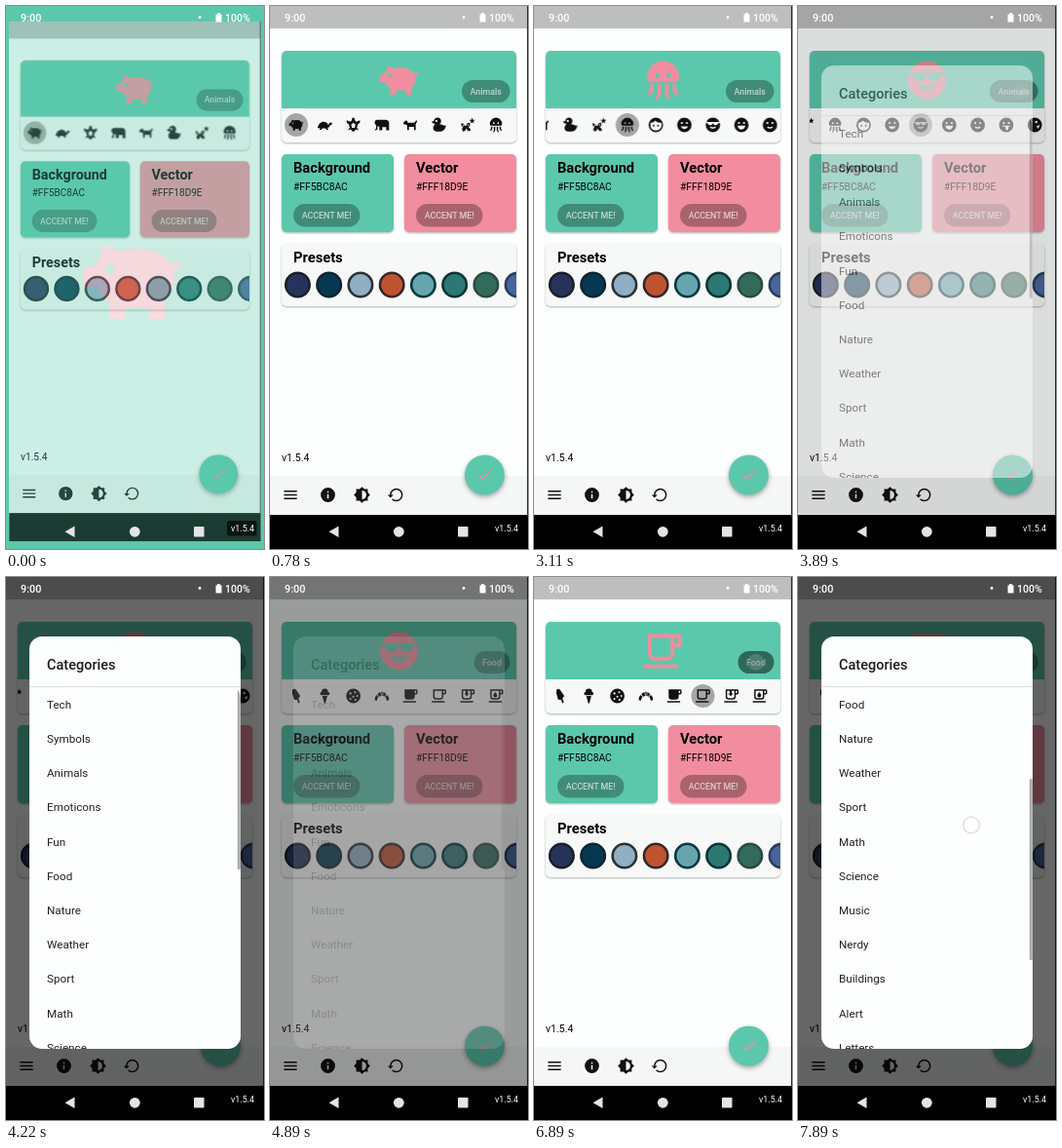
These frames come from a looping animation (265x557 px, 8 s). An HTML page:

```html
<!DOCTYPE html>
<html lang="en">
<head>
<meta charset="utf-8">
<title>Icon picker</title>
<style>
html, body { margin: 0; width: 100%; height: 100%; overflow: hidden; background: #5bc8ac; }
svg { display: block; }
text { font-family: Roboto, sans-serif; }
.card { filter: drop-shadow(0 1px 1.2px rgba(0,0,0,.3)); }
.fab { filter: drop-shadow(0 2px 2.5px rgba(0,0,0,.35)); }
.h { font-size: 14.7px; font-weight: 700; }
.b { font-size: 8.9px; font-weight: 500; fill: #fff; fill-opacity: .65; text-anchor: middle; }
.item { font-size: 11.7px; fill: #222; }
</style>
</head>
<body>
<svg id="stage" width="265" height="557" viewBox="0 0 265 557"></svg>
<script>
const LOOP = 8000, TEAL = '#5bc8ac', PINK = '#f18d9e', PALE = '#f7f9f8';
const DISC = 'M12 2A10 10 0 1 0 12 22A10 10 0 1 0 12 2Z';
const dot = (x, y, r) => `M${x - r} ${y}a${r} ${r} 0 1 0 ${2 * r} 0a${r} ${r} 0 1 0 ${-2 * r} 0Z`;
const EYES = dot(8.5, 9.3, 1.5) + dot(15.5, 9.3, 1.5);
const CUP = 'M2 21V19H20V21H2M20 8V5H18V8H20M20 3A2 2 0 0 1 22 5V8A2 2 0 0 1 20 10H18V13A4 4 0 0 1 14 17H8A4 4 0 0 1 4 13V3H20';
const HOLLOW = 'M16 5H6V13A2 2 0 0 0 8 15H14A2 2 0 0 0 16 13V5Z';

const PIG = 'M22 8.5C21.6 9.6 20.9 9.8 20.4 9.6C21 12.5 20 14.6 18.6 16V19.8H15.6V17.4H10.4V19.8H7.4V16.2C6 15.4 5.2 14.3 4.7 13.2H2V9.4L4.2 9C4.5 8 5.1 7.2 5.8 6.6L5.4 4.8C7 4.7 8.2 5.1 9.2 5.9C11.6 5.2 14.6 5.2 16.6 6C18.3 6.7 19.4 7.6 20 8.6C20.7 8.8 21 8.4 21.2 7.6Z' + dot(7.3, 9.6, 1);
const ANIMALS = [
  PIG,
  'M2 16.5C2.6 11 6.4 7.6 10.6 7.6C14 7.6 16 9.6 16.8 12L18.4 9.6C19.2 8.4 22 8.2 22 10.4C22 12 20.6 12.2 19.6 12.4C18.8 14.6 17.4 15.8 15.6 16.2L17.2 18.6H14.4L12.8 16.6H8.4L7 18.6H4.4L5.4 16.3Z',
  'M12 2A2 2.4 0 0 1 13.8 5.6A5.5 6.5 0 0 1 16 7.6L21 5.6Q22.6 9 18 11.4A7 7 0 0 1 16.8 15.6L19.6 19.6L15.4 18.2A5 5 0 0 1 12 21.6A5 5 0 0 1 8.6 18.2L4.4 19.6L7.2 15.6A7 7 0 0 1 6 11.4Q1.4 9 3 5.6L8 7.6A5.5 6.5 0 0 1 10.2 5.6A2 2.4 0 0 1 12 2ZM12 9L9 11.5L10.2 16H13.8L15 11.5Z',
  'M5.5 5H17Q22 5 22 10V19.5H18V15H12.5V19.5H8.5V14.5C7 14.5 6.4 13.8 6 12.8V17.5Q5.8 19.5 3.6 19.5H2.4V17.7H3.2Q4 17.6 4 16.6V12Q2 11.5 2 8.5Q2.2 5 5.5 5Z',
  'M2 9.2L5.4 6L7.4 6.2L8.4 9H17.2L20.4 5.6L21.6 6.6L19.4 10.8V19H17V14.8H10V19H7.6V13.6L6.4 11.4H3Z',
  'M10 2A5 5 0 0 1 15 7C15 8.7 14.15 10.2 12.86 11.1C14.44 11.25 16.22 11.61 18 12.5C21 14 22 12 22 12C22 12 21 21 15 21H9C9 21 4 21 4 16C4 13 7 12 6 10C2 10 2 6.5 2 6.5C3 7 4.24 7 5 6.65C5.19 4.05 7.36 2 10 2Z' + dot(8.5, 6.5, 1.5),
  'M10 14L4 9Q2 13 6 15Q3 18 6 21Q9 21.5 10 17Q13 22 16 20Q17 17 13 15.5Q17 13 15 9Q11 8 10 14ZM18.5 2L19.6 4.8L22.5 5L20.2 6.9L21 9.8L18.5 8.2L16 9.8L16.8 6.9L14.5 5L17.4 4.8Z' + dot(6.5, 13, .9) + dot(13, 12, .9),
  'M12 2A8.5 8.5 0 0 1 20.5 10.5Q20.5 12.5 19 13H5Q3.5 12.5 3.5 10.5A8.5 8.5 0 0 1 12 2ZM5 14.2H7V17Q7 19 5 20H3.4Q5 18.5 5 16ZM9 14.2H11V19L9.4 22H8L9 19ZM13 14.2H15V19L16 22H14.6L13 19ZM17 14.2H19V16Q19 18.5 20.6 20H19Q17 19 17 17Z' + dot(9, 9.5, 1.2) + dot(15, 9.5, 1.2)
];
const FACES = [
  DISC + 'M5 9Q9 9 11 6Q14 9.5 19.5 9Q21 14 17.6 17.6Q12 22 6.4 17.6Q3.4 14 5 9Z' + dot(9, 13, 1.25) + dot(15, 13, 1.25),
  DISC + EYES + 'M7 14H17Q15.5 17.6 12 17.6Q8.5 17.6 7 14Z',
  'M3.22 7.22C4.91 4.11 8.21 2 12 2C15.79 2 19.09 4.11 20.78 7.22L20 8H4L3.22 7.22M21.4 8.6C21.78 9.67 22 10.81 22 12A10 10 0 0 1 12 22A10 10 0 0 1 2 12C2 10.81 2.22 9.67 2.6 8.6L4 10H5C5 11.38 7.12 12.5 8.5 12.5C9.88 12.5 11.25 11.38 11.25 10H12.75C12.75 11.38 14.12 12.5 15.5 12.5C16.88 12.5 19 11.38 19 10H20L21.4 8.6M16.19 15.42L14.77 14C14.32 14.72 13.25 15.23 12 15.23C10.75 15.23 9.68 14.72 9.23 14L7.81 15.42C8.71 16.5 10.25 17.23 12 17.23C13.75 17.23 15.29 16.5 16.19 15.42Z',
  DISC + EYES + 'M6.5 13H17.5Q16 18.5 12 18.5Q8 18.5 6.5 13Z',
  DISC + EYES + 'M7.8 15.4L9.2 14Q12 16.4 14.8 14L16.2 15.4Q12 19 7.8 15.4Z',
  DISC + EYES + 'M7 13H17V14.5H15V17.5Q14.8 19.5 13 19.5Q11 19.5 11 17.5V14.5H7Z',
  DISC + dot(14, 8, 1.6) + 'M14 14L19 12L17 17Z'
];
const FOOD = [
  'M7 3Q10 1 12 4L17.5 12L15 15.6L17 21L15 22L13 17.5L9 17L6.5 8Z',
  'M12 2A4.5 4.5 0 0 1 16.5 6.5A2.2 2.2 0 0 1 16.5 11H7.5A2.2 2.2 0 0 1 7.5 6.5A4.5 4.5 0 0 1 12 2ZM8.5 12H15.5L12.8 22H11.2Z',
  DISC + dot(8, 8.5, 1.5) + dot(14.5, 7, 1.3) + dot(17.5, 12, 1.2) + dot(12, 13, 1.3) + dot(8, 16, 1.3) + dot(15, 17.5, 1.4),
  'M2 17Q2 12.5 5 10.5L7.5 13.5Q5.5 15 5.4 18.2Q3 19 2 17ZM5.8 9.8Q8 7 10 6.6L11 12Q9.6 12.1 8.4 12.9ZM11 6.4H13L13 12H11.9ZM14 6.6Q16 7 18.2 9.8L15.6 12.9L13.8 12.1ZM19 10.5Q22 12.5 22 17Q21 19 18.6 18.2Q18.5 15 16.5 13.5Z',
  'M2 21H20V19H2M20 8H18V5H20M20 3H4V13A4 4 0 0 0 8 17H14A4 4 0 0 0 18 13V10H20A2 2 0 0 0 22 8V5C22 3.89 21.1 3 20 3Z',
  CUP + HOLLOW,
  CUP + 'M16 5H12.5V8.5H14.5L11 12.5L7.5 8.5H9.5V5H6V13A2 2 0 0 0 8 15H14A2 2 0 0 0 16 13V5Z',
  CUP + HOLLOW + 'M11 6.5Q14 10 13.8 11.3A2.8 2.8 0 0 1 8.2 11.3Q8 10 11 6.5Z'
];
const BAR = [
  [21, 'M3 6H21V8H3V6M3 11H21V13H3V11M3 16H21V18H3V16Z'],
  [59.5, DISC + 'M11 7H13V9H11ZM11 11H13V17H11Z'],
  [94.5, 'M12 18V6A6 6 0 0 1 18 12A6 6 0 0 1 12 18M20 15.31L23.31 12L20 8.69V4H15.31L12 .69L8.69 4H4V8.69L.69 12L4 15.31V20H8.69L12 23.31L15.31 20H20V15.31Z'],
  [129, 'M13 3A9 9 0 0 0 4 12H1L4.89 15.89L9 12H6A7 7 0 0 1 13 5A7 7 0 0 1 20 12A7 7 0 0 1 13 19C11.07 19 9.32 18.21 8.06 16.94L6.64 18.36C8.27 20 10.5 21 13 21A9 9 0 0 0 22 12A9 9 0 0 0 13 3Z']
];
const CHECK = 'M21 7L9 19L3.5 13.5L4.91 12.09L9 16.17L19.59 5.59L21 7Z';
const PRESETS = [['#26345c', '#1a2029'], ['#063852', '#10242e'], ['#90afc5', '#2a3132'], ['#c05430', '#34292a'],
  ['#66a5ad', '#07393f'], ['#2c7873', '#0b3435'], ['#336b5b', '#2c4a45'], ['#46659b', '#2b3d5e']];
const LIST = ['Tech', 'Symbols', 'Animals', 'Emoticons', 'Fun', 'Food', 'Nature', 'Weather', 'Sport', 'Math', 'Science',
  'Music', 'Nerdy', 'Buildings', 'Alert', 'Letters', 'Numbers'];

// Tap times paired with the tapped position in each row
const PICKS = [[-1, 0], [1050, 1], [1320, 2], [1590, 3], [1870, 4], [2150, 5], [2450, 6], [2700, 7], [3480, 10]];
const FOOD_PICKS = [[5440, 0], [5660, 1], [5880, 2], [6080, 3], [6270, 4], [6500, 5]];
const SWAP = 4790, OPEN = [3840, 6950];

let css = '', count = 0;
// Adds keyframes from [ms, value] steps and returns the style attribute
function key(prop, steps, ease = 'linear') {
  const all = [...steps], last = all[all.length - 1];
  if (all[0][0] > 0) all.unshift([0, all[0][1]]);
  if (last[0] < LOOP) all.push([LOOP, last[1]]);
  const name = 'k' + count++;
  css += `@keyframes ${name}{${all.map(([t, v]) => `${t * 100 / LOOP}%{${prop}:${v}}`).join('')}}`;
  return `style="animation:${name} ${LOOP}ms ${ease} infinite"`;
}
function show(a, b = LOOP, fade = 1) {
  const steps = a < 0 ? [[0, 1]] : [[a, 0], [a + fade, 1]];
  if (b < LOOP) steps.push([b, 1], [b + fade, 0]);
  return key('opacity', steps);
}
const rect = (x, y, w, h, fill, more = '') => `<rect x="${x}" y="${y}" width="${w}" height="${h}" fill="${fill}" ${more}/>`;
const circle = (x, y, r, fill, more = '') => `<circle cx="${x}" cy="${y}" r="${r}" fill="${fill}" ${more}/>`;
const text = (x, y, s, more = '') => `<text x="${x}" y="${y}" ${more}>${s}</text>`;
const icon = (d, x, y, s, fill = '#111') =>
  `<path d="${d}" fill="${fill}" fill-rule="evenodd" transform="translate(${x - 12 * s} ${y - 12 * s}) scale(${s})"/>`;
const slot = i => 27 + 29.3 * i;

function row(icons, picks, end) {
  const marks = picks.map(([t, i], n) => {
    const x = slot(i), next = n + 1 < picks.length ? picks[n + 1][0] + 110 : end;
    const press = t < 0 ? '' : `<g ${show(t, t + 190, 25)}>${rect(x - 14.5, 107.5, 29, 29, '#000', 'opacity=".13"')}${circle(x, 122, 12, '#000', 'opacity=".25"')}</g>`;
    return press + `<g ${show(t, next, 25)}>${circle(x, 122, 12, '#000', 'opacity=".33"')}</g>`;
  });
  return marks.join('') + icons.map((d, i) => icon(d, slot(i), 122, .74)).join('');
}
function hero() {
  const strip = [...ANIMALS, ...FACES];
  const seq = [...PICKS.map(([t, i]) => [t, strip[i]]), ...FOOD_PICKS.map(([t, i]) => [t, FOOD[i]])];
  return seq.map(([t, d], n) => `<g ${show(t, n + 1 < seq.length ? seq[n + 1][0] : LOOP)}>${icon(d, 132.5, 76, 1.95, PINK)}</g>`).join('');
}
const chip = (x, w, label) => rect(x, 76, w, 23, '#000', 'rx="11.5" opacity=".3"') + text(x + w / 2, 90.5, label, 'class="b"');
const colorCard = (x, fill, title, hex) => `<g class="card">${rect(x, 152, 115, 80, fill, 'rx="5"')}</g>`
  + text(x + 12, 171, title, 'class="h"') + text(x + 12, 188.5, hex, 'font-size="10.3"')
  + rect(x + 12, 203, 68.5, 23.5, '#000', 'rx="11.7" opacity=".3"') + text(x + 46.2, 218, 'ACCENT ME!', 'class="b"');

function screen() {
  return rect(0, 0, 265, 557, '#fdfffe') + rect(0, 0, 265, 23, '#bdbfbe') + rect(0, 482, 265, 40, '#f4f7f6')
    + `<g class="card">${rect(12, 46, 241, 94, PALE, 'rx="5"')}</g>`
    + `<path d="M12 105V51a5 5 0 0 1 5-5H248a5 5 0 0 1 5 5V105Z" fill="${TEAL}"/>` + hero()
    + `<g ${show(-1, SWAP)}>${chip(197, 49.5, 'Animals')}</g><g ${show(SWAP)}>${chip(209.5, 37, 'Food')}</g>`
    + [[3680, 3860, 197, 49.5], [6810, 7010, 209.5, 37]].map(([a, b, x, w]) =>
      `<g ${show(a, b, 50)}>${rect(x, 76, w, 23, '#000', 'rx="11.5" opacity=".25"')}${circle(228, 87.5, 8.5, '#fff', 'opacity=".15"')}</g>`).join('')
    + `<g clip-path="url(#strip)"><g ${show(-1, SWAP)}><g ${key('transform', [[2800, 'translate(0,0)'], [3300, 'translate(-194px,0)']], 'ease-in-out')}>`
    + row([...ANIMALS, ...FACES], PICKS, LOOP) + `</g></g><g ${show(SWAP)}>${row(FOOD, FOOD_PICKS, LOOP)}</g></g>`
    + colorCard(12, TEAL, 'Background', '#FF5BC8AC') + colorCard(138, PINK, 'Vector', '#FFF18D9E')
    + `<g class="card">${rect(12, 244, 241, 64, PALE, 'rx="5"')}</g>` + text(24, 263, 'Presets', 'class="h"')
    + `<g clip-path="url(#presets)">${PRESETS.map(([f, s], i) => circle(28.4 + 32.25 * i, 286, 12.2, f, `stroke="${s}" stroke-width="2.6"`)).join('')}</g>`
    + text(12, 466.5, 'v1.5.4', 'font-size="10.5"') + BAR.map(([x, d]) => icon(d, x, 501.5, .74)).join('')
    + `<g class="fab">${circle(220.5, 481, 20.5, TEAL)}</g>` + icon(CHECK, 220.5, 481, .74, PINK)
    + rect(0, 522, 265, 35, '#000') + rect(264, 0, 1, 522, '#333');
}
function dialog() {
  const fade = [[OPEN[0], 0], [OPEN[0] + 100, 1], [4790, 1], [4908, 0], [OPEN[1], 0], [OPEN[1] + 100, 1]];
  const dim = [[OPEN[0], 0], [OPEN[0] + 230, .6], [4790, .6], [5080, 0], [OPEN[1], 0], [OPEN[1] + 230, .6]];
  const move = y => [[7590, 'translate(0,0)'], [7885, `translate(0,${y}px)`]];
  return `<g ${key('opacity', dim)}>${rect(0, 0, 265, 522, '#000')}</g><g ${key('opacity', fade)}>`
    + rect(24, 61, 217, 423, '#fdfefe', 'rx="13"') + text(42, 95, 'Categories', 'font-size="14.5" font-weight="500" fill="#1c1c1c"')
    + rect(24, 112, 217, 1, '#dcdedd') + `<g clip-path="url(#list)"><g ${key('transform', move(-176), 'ease-out')}>`
    + `<g ${show(4540, 4800, 40)}>${rect(24, 289, 217, 35.2, '#000', 'opacity=".1"')}</g>`
    + LIST.map((s, i) => text(42, 134.7 + 35.2 * i, s, 'class="item"')).join('') + '</g>'
    + `<g ${key('transform', move(93), 'ease-out')}>${rect(237.8, 114, 3, 186, '#a9abaa', 'rx="1"')}</g></g></g>`
    + `<g ${show(7580, LOOP, 30)}><g ${key('transform', [[7590, 'translate(0,176px)'], [7885, 'translate(0,0)']], 'ease-out')}>`
    + circle(178, 254.5, 8.3, 'rgba(255,255,255,.5)', 'stroke="#dadcdb" stroke-width="1.3"') + '</g></g>';
}
function system() {
  return `<g fill="#fff">` + text(15, 15.7, '9:00', 'font-size="10.8" font-weight="500"') + text(225, 15.7, '100%', 'font-size="10.5" font-weight="500"')
    + circle(199, 11.5, 1.4, '#fff') + '<path d="M215.5 8.5H217V7H220V8.5H221.500V16.500H215.500Z"/></g>'
    + '<path d="M70.500 533.500V545L60.500 539.200Z" fill="#e4e4e4"/>' + circle(132.3, 539.3, 5.4, '#e4e4e4')
    + rect(193, 534, 10.5, 10.5, '#e4e4e4', 'rx=".8"')
    + `<g ${key('opacity', [[0, 1], [300, 1], [700, 0]])}>${rect(227, 528, 30.5, 15.5, '#000', 'rx="2" opacity=".65"')}</g>`
    + text(231, 538.7, 'v1.5.4', 'font-size="8.9" fill="#fff"');
}
const clip = (id, x, y, w, h, r) => `<clipPath id="${id}">${rect(x, y, w, h, '#000', `rx="${r}"`)}</clipPath>`;

document.getElementById('stage').innerHTML =
  `<defs>${clip('strip', 12, 105, 241, 35, 3)}${clip('presets', 12, 244, 241, 64, 5)}${clip('list', 24, 113, 217, 371, 10)}</defs>`
  + rect(0, 0, 265, 557, TEAL) + icon(PIG, 130, 282, 5, PINK)
  + `<g ${key('opacity', [[0, .7], [120, 1]])}><g ${key('transform', [[0, 'translate(3.3px,11.15px) scale(.975)'], [330, 'translate(0px,0px) scale(1)']], 'ease-out')}>${screen()}</g></g>`
  + `<g ${key('transform', [[0, 'translate(0,0)'], [220, 'translate(0,-16px)']])}>${rect(0, 0, 265, 16, TEAL)}</g>`
  + `<g ${key('transform', [[0, 'translate(0,0)'], [220, 'translate(0,8px)']])}>${rect(0, 549, 265, 8, TEAL)}</g>`
  + dialog() + system();
document.head.appendChild(document.createElement('style')).textContent = css;
</script>
</body>
</html>
```
